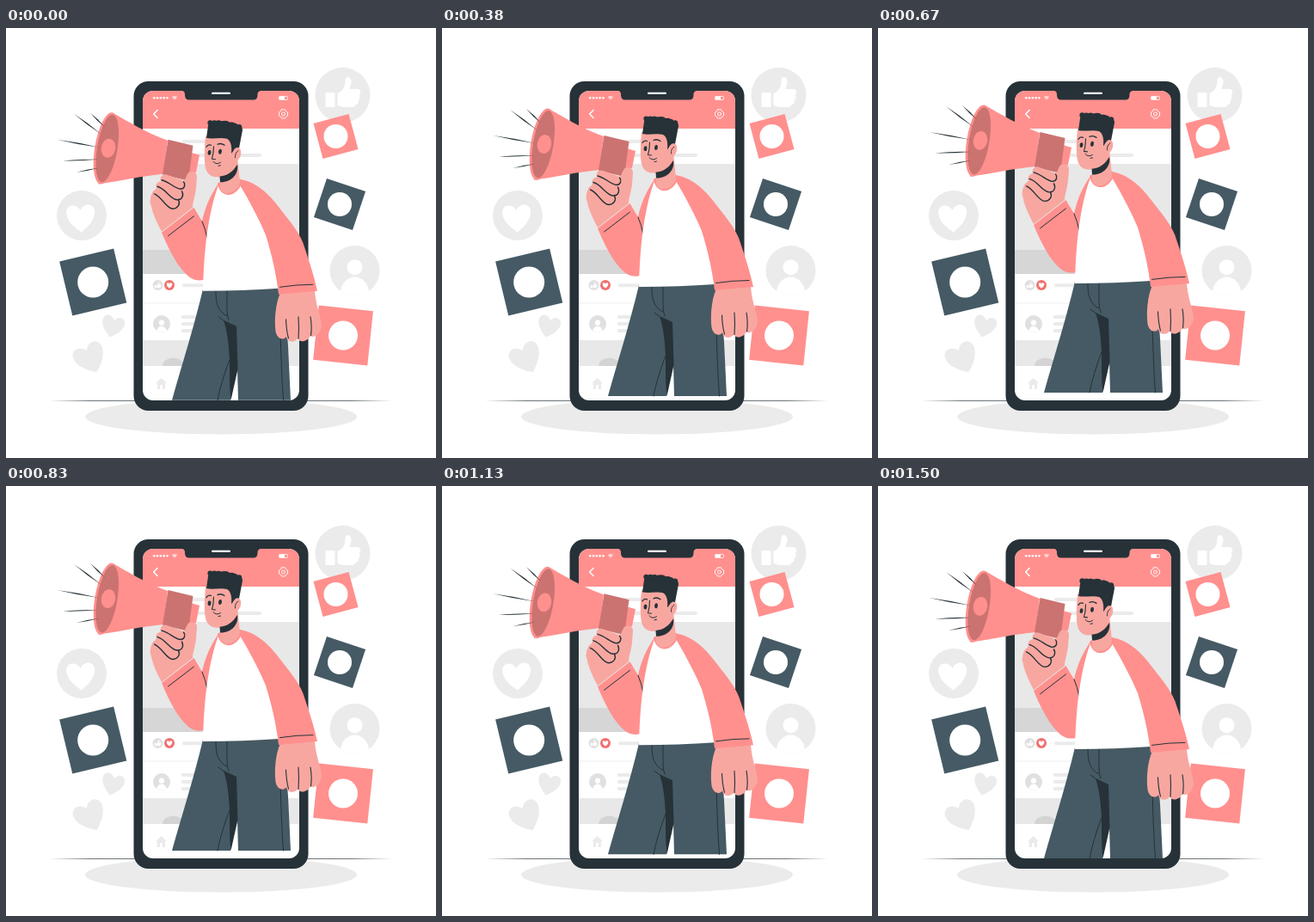
Recreate the animation shown at these times as an HTML page with a canvas. Size 500 px wide and 500 px high, loop 1.54 s.

```html
<!DOCTYPE html>
<html lang="en">
<head>
<meta charset="utf-8">
<title>Megaphone and phone</title>
<style>
html, body { margin: 0; width: 100%; height: 100%; overflow: hidden; background: #fff; }
canvas { display: block; width: 500px; height: 500px; }
</style>
</head>
<body>
<canvas id="stage" width="500" height="500"></canvas>
<script>
const ctx = document.getElementById('stage').getContext('2d');
const LOOP = 1540, PEAK = 745, RISE = 10.2;
const DARK = '#263238', SLATE = '#455a64', PINK = '#ff908e', GRIP = '#cb7371',
      SKIN = '#f8a7a0', PALE = '#ebebeb', GREY = '#e0e0e0', WHITE = '#fff';

const fill = (d, color) => { ctx.fillStyle = color; ctx.fill(new Path2D(d)); };
const line = (d, color = DARK, width = 1) => {
  ctx.strokeStyle = color;
  ctx.lineWidth = width;
  ctx.lineCap = ctx.lineJoin = 'round';
  ctx.stroke(new Path2D(d));
};
const oval = (x, y, rx, ry, color, angle = 0) => {
  ctx.fillStyle = color;
  ctx.beginPath();
  ctx.ellipse(x, y, rx, ry, angle * Math.PI / 180, 0, 7);
  ctx.fill();
};
const disc = (x, y, r, color) => oval(x, y, r, r, color);
const box = (x, y, w, h, color, r = 0) => {
  ctx.fillStyle = color;
  ctx.beginPath();
  ctx.roundRect(x, y, w, h, r);
  ctx.fill();
};
const placed = (x, y, angle, scale, draw) => {
  ctx.save();
  ctx.translate(x, y);
  ctx.rotate(angle * Math.PI / 180);
  ctx.scale(scale, scale);
  draw();
  ctx.restore();
};
const heart = (x, y, halfWidth, angle, color) => placed(x, y, angle, halfWidth / 10, () =>
  fill('M0 10C-4 7-10 2-10-4C-10-10-3-11 0-5.5C3-11 10-10 10-4C10 2 4 7 0 10Z', color));
const tile = (x, y, side, angle, color, dot) => {
  placed(x, y, angle, 1, () => box(-side / 2, -side / 2, side, side, color));
  disc(x, y, dot, WHITE);
};
const person = (x, y, r, color) => {
  disc(x, y, r, color);
  ctx.save();
  ctx.beginPath();
  ctx.arc(x, y, r, 0, 7);
  ctx.clip();
  disc(x, y - r * .13, r * .31, WHITE);
  oval(x, y + r * .9, r * .57, r * .64, WHITE);
  ctx.restore();
};
const thumb = (x, y, scale) => placed(x, y, 0, scale, () => {
  box(-20, -3, 11, 17, WHITE, 1);
  fill('M-6-2C0-4 3-10 3-17C3-23 10-22 10-15C10-12 8-9 8-7H17C21-7 22-2 19 0C21 2 20 5 18 6C19 9 17 11 15 11C15 13 13 14 11 14H0L-6 12Z', WHITE);
});
// A straight stroke that is thickest in its middle.
const ray = (x1, y1, x2, y2) => {
  const mx = (x1 + x2) / 2, my = (y1 + y2) / 2;
  fill(`M${x1} ${y1}Q${mx + .8} ${my - 1.3} ${x2} ${y2}Q${mx - .8} ${my + 1.3} ${x1} ${y1}Z`, DARK);
};

function surroundings() {
  oval(250, 452, 158, 20.5, PALE);
  const fade = ctx.createLinearGradient(50, 0, 449, 0);
  [['0', 0], ['.12', .9], ['.88', .9], ['1', 0]].forEach(([stop, alpha]) =>
    fade.addColorStop(+stop, `rgba(38,50,56,${alpha})`));
  box(50, 433, 399, .8, fade);

  disc(391.5, 78, 32, PALE);
  thumb(391.5, 78, 1);
  disc(88, 218, 29, PALE);
  heart(87, 221, 16.5, -3, WHITE);
  heart(124, 347, 13, 14, PALE);
  heart(98, 384, 18, -25, PALE);
  person(405.5, 282, 29, PALE);

  tile(101.2, 295.5, 64.8, -13.5, SLATE, 18);
  tile(383.5, 126, 42.5, -15, PINK, 14);
  tile(388, 205, 47.5, 18.5, SLATE, 14);
  tile(392, 357.5, 63.5, 6, PINK, 17);
}

function phone() {
  box(148.5, 62, 203, 383, DARK, 17);
  ctx.save();
  ctx.beginPath();
  ctx.roundRect(159, 73, 182, 360, 12);
  ctx.clip();
  box(159, 73, 182, 360, WHITE);
  box(159, 73, 182, 44, PINK);

  box(205, 130, 62, 4, PALE, 2);
  box(205, 146, 92, 4, PALE, 2);
  box(159, 158, 182, 100, '#e8e8e8');
  box(159, 258, 182, 28, '#d6d6d6');
  disc(176.5, 299, 6, GREY);
  thumb(176.5, 299.5, .19);
  disc(190, 299, 6, '#f0706e');
  heart(190, 299.3, 3.3, 0, WHITE);
  box(205, 297.2, 40, 4, PALE, 2);
  box(159, 319.5, 182, 1, '#f0f0f0');
  person(181, 344, 10, GREY);
  for (const y of [334, 342, 350]) box(204, y, 40, 4, PALE, 1);
  box(159, 363, 182, 30, '#e8e8e8');
  fill('M182 393A12.5 9.5 0 0 1 207 393Z', '#d4d4d4');
  fill('M174 413L180.5 407L187 413H185V420H182V415H179V420H176V413Z', PALE);
  ctx.restore();

  fill('M204 72.5C207 73 208 75 208 77C208 82 210 83.5 213 83.5H287C291 83.5 292.5 82 292.5 77C292.5 75 294 73 297 72.5Z', DARK);
  box(239, 74.8, 22, 2.3, WHITE, 1.1);
  for (let i = 0; i < 5; i++) disc(172.2 + i * 3.8, 81.3, 1.3, WHITE);
  fill('M192.8 80Q196 77.8 199.2 80L196 83.8Z', '#ffd4d3');
  line('M318.5 79.5H326.5Q327.5 79.5 327.5 80.5V82.5Q327.5 83.5 326.5 83.5H318.5Q317.5 83.5 317.5 82.5V80.5Q317.5 79.5 318.5 79.5Z', WHITE, .8);
  box(318, 80, 6, 3, WHITE);
  line('M176 95.5L171.7 100L176 104.5', WHITE, 1.5);
  line('M320.5 94.8H324.5L325.5 96.8L327.5 98V102L325.5 103.2L324.5 105H320.5L319.5 103.2L317.5 102V98L319.5 96.8Z', WHITE, .9);
  line('M324.5 100A2 2 0 1 1 320.5 100A2 2 0 1 1 324.5 100', WHITE, .9);
}

function trousers() {
  fill('M229 304L317 301C322 320 327 350 328 370L331 433H270L269 396L261 433H193C205 390 218 350 229 304Z', SLATE);
  fill('M253 340L268 347L269.5 397L261.5 433C260 420 260 408 260 386C259 370 258 355 253 340Z', DARK);
  line('M260 386Q250 412 246 433');
  line('M244 306C244 320 246 330 257 335');
  line('M257 306V328Q257 335 259 340M247 336L255 342');
  line('M319 350Q320 400 322.5 433');
}

function torso() {
  fill('M247 181C236 197 231 211 228 225L218.5 209L181 238C191 262 203 284 216 291.5C221 294 226 294 230 293L252 200Z', PINK);
  line('M188.5 242L218.5 219');
  line('M228 225Q232 234 234 245');
  fill('M247 183C237 210 230 250 229 306Q275 306 317 303L312 262L290 205L273 180Z', WHITE);

  fill('M319 308C313 322 312 340 313.5 353C315 362 323 364 326 359C327 367 337 366 339.5 361C341 367 351 365 354 358C358 362 367 355 367 345C365 332 360 322 359 305Z', SKIN);
  line('M325.5 339Q326 352 328.5 361M340 336Q341 350 340 361.5M354 336Q356 348 354.5 358', DARK, 1.1);
  fill('M272 176C294 180 308 196 320 212C334 230 343 241 347 255C353 273 358 288 362 306L317 310C314 285 309 264 302 241C295 224 284 203 272 183Z', PINK);
  line('M318.5 301.5Q338 298.5 357 298.5');
}

function head() {
  fill('M246 181C249 200 270 198 275 178L269 174L249 179Z', PINK);
  fill('M249 165V186C252 197 269 193 272 180L269 150Z', SKIN);
  fill('M232 126C231 138 230 153 232 163C234 172 242 175 250 173C259 171 266 163 268 154L272 128Z', SKIN);
  fill('M248.5 172.8C258 172 264 167 269 159C271 170 262 180 249 179.5Z', DARK);
  fill('M233 128L235 114C236 110 239 108 243 109C246 107 249 108 251 109C255 107 258 108 260 110C264 109 267 111 269 113C273 113 275 116 275 119L271 140L265 143L262 146C263 137 261 131 257 129C249 127 240 130 233 128Z', DARK);
  for (let i = 0; i < 8; i++) disc(237.5 + i * 4.8, 110.5 + i * i * .1, 3.1, DARK);
  oval(268, 147, 5, 8, SKIN, 16);
  line('M270 143Q266 145 266.5 151', DARK, .9);

  oval(236.5, 145.2, 1.9, 2.9, DARK, 5);
  oval(249, 143.9, 1.9, 3, DARK, 5);
  line('M233 138.5Q235 135 238.5 136.5M246 135.5Q250 133.5 254 136.5', DARK, 1.3);
  line('M241.5 138Q241.5 146 239.5 152.5L243.5 153', DARK, 1.1);
  line('M241 155.5Q244.5 160 249.5 156.5M247 160.5L249.5 160');
}

function megaphone() {
  fill('M124 98.7C142 109 163 122 188 131L183 170C160 172 133 178 107 181.8Z', PINK);
  oval(116.5, 140.2, 13.3, 42.2, PINK, 9.5);
  oval(117.7, 140.2, 11.8, 39.7, GRIP, 9.5);
  oval(119, 140, 8.2, 11, PINK, 10);
  fill('M215 145L225 148L221 168L211 170Z', PINK);
  fill('M188.5 130L217.5 137L212 178L182 170.5Z', GRIP);
  ray(79, 100, 111, 124);
  ray(98, 99, 115, 115.5);
  ray(59.5, 130, 108, 139);
  ray(66, 154.5, 107, 153);
  ray(82, 168, 108, 163);
}

function grippingHand() {
  fill('M181 237C173 222 168 210 168 199C168 194 171 192 173 189L182 176C190 177 198 184 205 183L211 170C213 166 222 166 222 173L221 187C220 196 217 203 217 209Z', SKIN);
  const fingers = ['M185 176L203 182.5', 'M180 184L201 193', 'M175 194L196 204', 'M173 202L190 212'];
  fingers.forEach(d => line(d, SKIN, 11));
  line('M181 177C190 179 196 187 203 187.5C208 187 209 182 206.5 179', DARK, 1.4);
  line('M176 184.5C186 187 190 199 199 200C205 200 207 195 204.5 190', DARK, 1.4);
  line('M172.5 193C182 197 186 210 194 210.5C200 210 203 205 200.5 200', DARK, 1.4);
}

function frame(now) {
  const t = now % LOOP;
  const gap = Math.abs(t - PEAK);
  const near = 1 - Math.min(gap, LOOP - gap) / (LOOP / 2);
  ctx.fillStyle = WHITE;
  ctx.fillRect(0, 0, 500, 500);
  surroundings();
  phone();
  ctx.save();
  ctx.translate(0, -RISE * Math.pow(near, 1.12));
  trousers();
  torso();
  head();
  megaphone();
  grippingHand();
  ctx.restore();
}

const start = performance.now();
function tick() {
  frame(performance.now() - start);
  requestAnimationFrame(tick);
}
tick();
</script>
</body>
</html>
```
